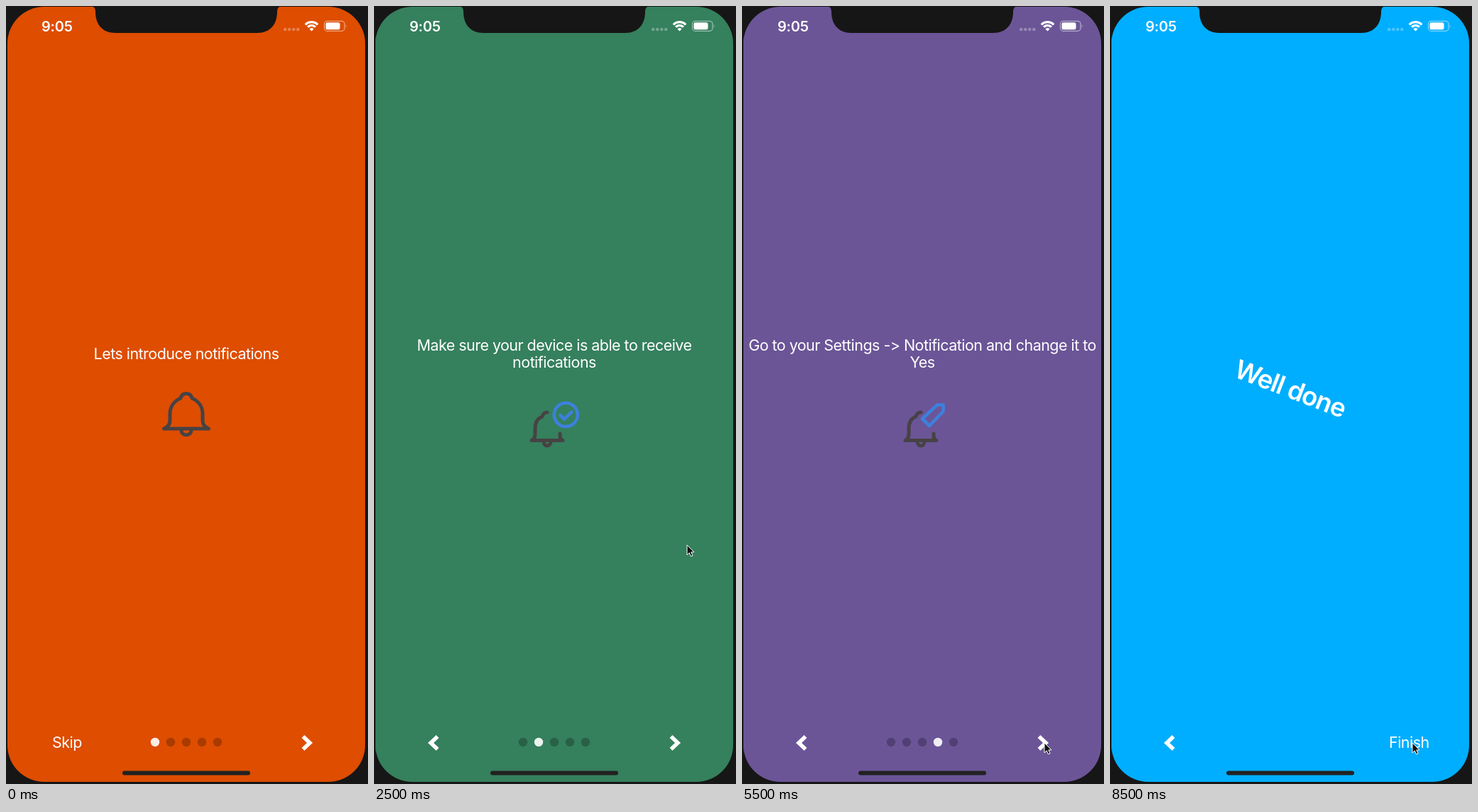
Recreate the animation shown at these times as an HTML page. Size 510 by 1097 pixels, loop 8600 ms.

```html
<!DOCTYPE html>
<html lang="en">
<head>
<meta charset="utf-8">
<title>Notification onboarding</title>
<style>
  html, body { margin: 0; width: 100%; height: 100%; overflow: hidden; background: #161616; }
  svg { display: block; width: 510px; height: 1097px; }
  text {
    font: 21.5px Inter, "Liberation Sans", sans-serif;
    letter-spacing: -.025em; fill: #fff;
    font-feature-settings: "calt" 0; font-variant-ligatures: none;
  }
  .mid { text-anchor: middle; }
  .time { font-size: 20px; font-weight: 600; letter-spacing: -.01em; }
  .done { font-size: 36.5px; font-weight: 600; letter-spacing: -.03em; }
  .bell, .mark { fill: none; stroke: #474244; stroke-width: 5; stroke-linecap: round; stroke-linejoin: round; }
  .mark { stroke: #3d80dc; stroke-width: 4.6; }
  .arrow { fill: none; stroke: #fff; stroke-width: 5.6; }
</style>
</head>
<body>
<svg viewBox="0 0 510 1097">
  <defs>
    <clipPath id="screen"><rect x="2" y="1" width="504" height="1093" rx="52"/></clipPath>
    <path id="smallBell" class="bell" d="M222 612.5H266M223 612C226 610 227 608 227 603V596C227 587 231 581 237 579C238 575 240 573 244 573M262 603V606C262 609 263 611 265 612M239 614C239 622 249 622 249 614"/>
  </defs>

  <g clip-path="url(#screen)">
    <g id="pages">
      <g>
        <text class="mid" x="254" y="497.5">Lets introduce notifications</text>
        <path id="bell" class="bell" d="M222.5 596H285.5M224 595C229 593 231 590 231 584V575C231 565 237 557 246 553C247 549 250 546.5 254 546.5C258 546.5 261 549 262 553C271 557 277 565 277 575V584C277 590 279 593 284 595M247 598C247 607 261 607 261 598"/>
      </g>
      <g>
        <text class="mid" x="254" y="485.5">Make sure your device is able to receive</text>
        <text class="mid" x="254" y="509.5">notifications</text>
        <use href="#smallBell"/>
        <path class="mark" d="M262.5 577L268 582.5L278.5 572.5"/>
        <circle class="mark" cx="270.3" cy="576.3" r="16.6"/>
      </g>
      <g>
        <text class="mid" x="254" y="485.5">If your notification module is not working, your</text>
        <text class="mid" x="254" y="509.5">device is not allowed to receive notifications</text>
        <use href="#smallBell"/>
        <path class="mark" d="M264.8 571.3L275.2 581.7M275.2 571.3L264.8 581.7"/>
        <circle class="mark" cx="270" cy="576.5" r="16"/>
      </g>
      <g>
        <text class="mid" x="254" y="485.5">Go to your Settings -&gt; Notification and change it to</text>
        <text class="mid" x="254" y="509.5">Yes</text>
        <use href="#smallBell" x="8"/>
        <path class="mark" d="M275 562.5H283.5V571.5L264 592L254 582Z"/>
      </g>
      <g>
        <text id="done" class="mid done" x="254" y="552.5">Well done</text>
      </g>
    </g>
  </g>

  <path fill="#161616" d="M120 0Q126 1 126 8C126 26 136 38 154 38H354C372 38 382 26 382 8Q382 1 388 0Z"/>
  <text class="time" x="50" y="35.5">9:05</text>
  <g fill="#fff" fill-opacity=".3">
    <circle cx="393.3" cy="33" r="2.3"/><circle cx="399.3" cy="33" r="2.3"/>
    <circle cx="405.3" cy="33" r="2.3"/><circle cx="411.3" cy="33" r="2.3"/>
  </g>
  <g fill="none" stroke="#fff" stroke-width="3.2">
    <path d="M421.8 26.3A12.3 12.3 0 0 1 439.2 26.3M425.1 29.6A7.6 7.6 0 0 1 435.9 29.6"/>
    <path fill="#fff" stroke="none" d="M430.5 35.5l-3-3a4.3 4.3 0 0 1 6 0z"/>
  </g>
  <rect x="448.5" y="21.3" width="28.5" height="14" rx="4" fill="none" stroke="#fff" stroke-opacity=".5" stroke-width="1.2"/>
  <rect x="450.5" y="23.3" width="20" height="10" rx="2.2" fill="#fff"/>
  <path fill="#fff" fill-opacity=".5" d="M478.6 26q2 2.3 0 4.6z"/>

  <text id="skip" x="65" y="1046">Skip</text>
  <text id="finish" x="393" y="1046">Finish</text>
  <path id="back" class="arrow" d="M89.5 1030L80 1039L89.5 1048"/>
  <path id="next" class="arrow" d="M418.5 1030L428 1039L418.5 1048"/>
  <g id="dots"></g>
  <rect x="164" y="1078.5" width="180" height="6" rx="3" fill="#222"/>
  <path id="cursor" fill="#111" stroke="#fff" d="M0 0V14L3.3 11L5.5 16L8 15L5.8 10H10Z"/>
</svg>

<script>
const LOOP = 8600, STEP = 100, WIDTH = 504;
const NS = "http://www.w3.org/2000/svg";
const get = id => document.getElementById(id);
const colors = ["#de4d00", "#35805d", "#bb2454", "#6b5597", "#00aeff"];
const arrivals = [2300, 3800, 5400, 6700];

// Tracks are lists of [time, value, ...]; drags share times with the cursor.
const scroll = [[1700, 0], [2000, 350], [2300, 504], [2900, 504], [3400, 891], [3500, 903],
  [3800, 1008], [5000, 1008], [5400, 1512], [6300, 1512], [6700, 2016]];
const pointer = [[1000, 380, 800], [1400, 404, 743], [1700, 440, 755], [2000, 90, 760],
  [2500, 441, 760], [2900, 444, 765], [3400, 57, 773], [3500, 45, 773],
  [4300, 300, 900], [4800, 426, 1039]];
const swing = [[6800, 0], [6900, -3], [7500, -60], [8200, 28], [8500, 21]];

function add(parent, tag, attrs) {
  const el = document.createElementNS(NS, tag);
  for (const key in attrs) el.setAttribute(key, attrs[key]);
  parent.prepend(el);
  return el;
}

function at(track, t, col = 1) {
  const i = track.findIndex(key => key[0] > t);
  if (i === 0) return track[0][col];
  if (i < 0) return track[track.length - 1][col];
  const a = track[i - 1], b = track[i];
  const p = (t - a[0]) / (b[0] - a[0]);
  return a[col] + (b[col] - a[col]) * p * p * (3 - 2 * p);
}

[...get("pages").children].forEach((page, i) => {
  page.setAttribute("transform", `translate(${i * WIDTH})`);
  add(page, "rect", { x: 2, width: WIDTH + 1, height: 1097, fill: colors[i] });
});
const dots = colors.map((_, i) => add(get("dots"), "circle", { cx: 210 + 22 * i, cy: 1038, r: 6.2 }));

const show = (id, on) => get(id).setAttribute("visibility", on ? "visible" : "hidden");
const transform = (id, value) => get(id).setAttribute("transform", value);

function draw(t) {
  const page = arrivals.filter(time => t >= time).length;
  const last = page === colors.length - 1;
  transform("pages", `translate(${-at(scroll, t)})`);
  transform("bell", `translate(0 ${1 - Math.cos(Math.PI * t / 1400)})`);
  transform("done", `rotate(${at(swing, t)} 254 539.5)`);
  transform("cursor", `translate(${at(pointer, t)} ${at(pointer, t, 2)})`);
  show("cursor", t >= 1000);
  show("skip", page === 0);
  show("back", page > 0);
  show("next", !last);
  show("finish", last);
  show("dots", !last);
  dots.forEach((dot, i) => {
    dot.setAttribute("fill", i === page ? "#fff" : "#000");
    dot.setAttribute("fill-opacity", i === page ? .9 : .24);
  });
}

function frame() {
  const t = performance.now() % LOOP;
  draw(Math.floor(t / STEP) * STEP);
  requestAnimationFrame(frame);
}
frame();
</script>
</body>
</html>
```
